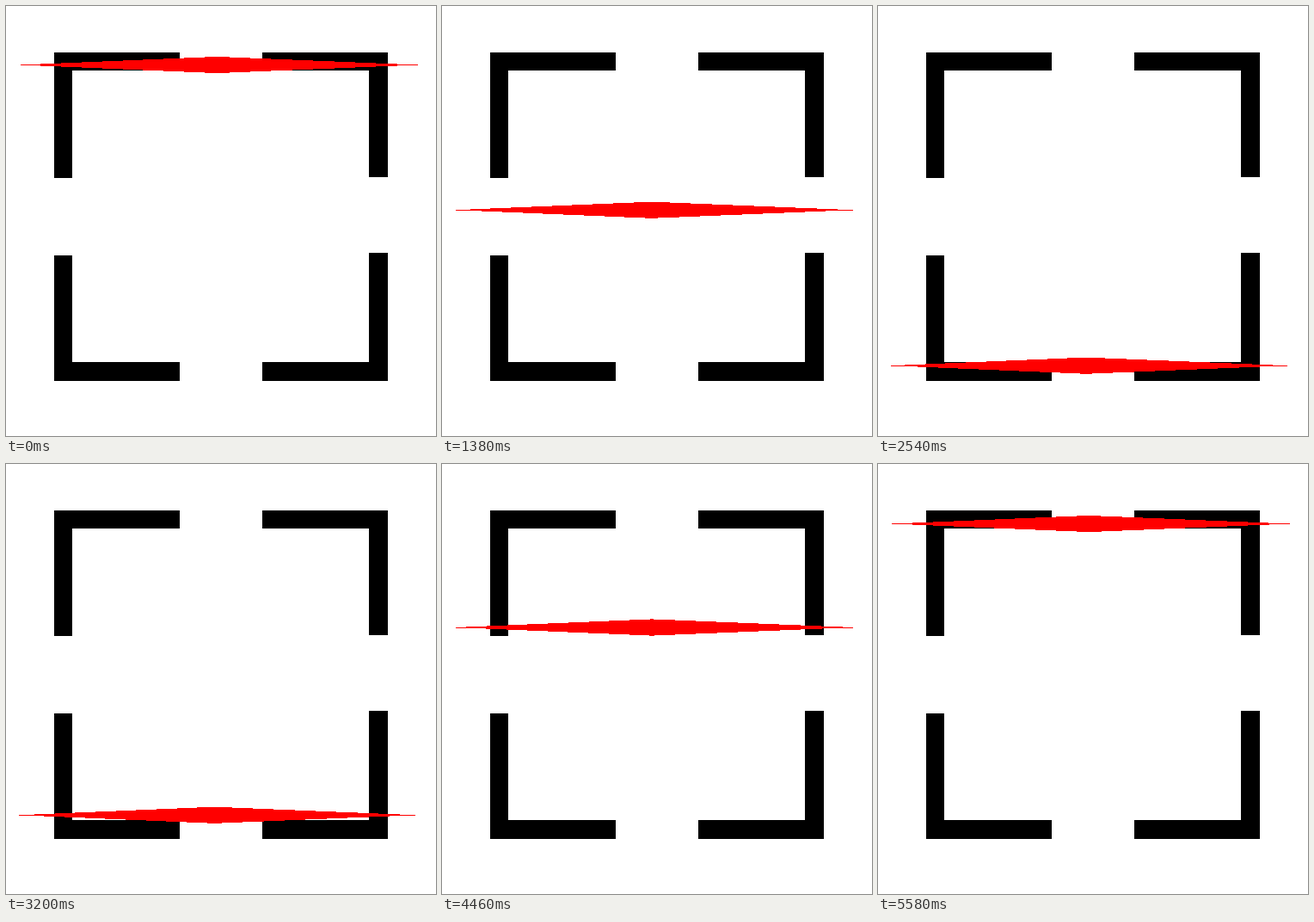
Write an HTML page with a canvas that moves like this. It is 500x500 px and loops after 5680 ms.

```html
<!DOCTYPE html>
<html>
<head>
<meta charset="utf-8">
<style>
html, body { margin: 0; width: 100%; height: 100%; overflow: hidden; background: #fff; }
canvas { display: block; width: 500px; height: 500px; }
</style>
</head>
<body>
<canvas id="stage" width="500" height="500"></canvas>
<script>
const ctx = document.getElementById('stage').getContext('2d');
const LOOP = 5680, LAST = 119, HALF = 59.6;
const TOP = 68.5, END = 69.5, BOTTOM = 422.3, THICK = 9.6;

// corner brackets: x, y, w, h
const bars = [
  [56, 54, 146, 21], [56, 54, 21, 146],
  [298, 54, 146, 21], [422, 54, 22, 145],
  [56, 414, 146, 22], [56, 290, 21, 146],
  [298, 414, 146, 22], [422, 287, 22, 149]
];

// cubic-bezier(.42, 0, .58, 1)
function ease(x) {
  let lo = 0, hi = 1;
  for (let i = 0; i < 24; i++) {
    const t = (lo + hi) / 2, u = 1 - t;
    if (3 * u * u * t * 0.42 + 3 * u * t * t * 0.58 + t * t * t < x) lo = t;
    else hi = t;
  }
  return lo * lo * (3 - 2 * lo);
}

// uneven cadence: three steps every 140 ms, held 20, 100 and 20 ms
function stepAt(ms) {
  const r = ms % 140;
  return Math.min(LAST, 3 * Math.floor(ms / 140) + (r < 20 ? 0 : r < 120 ? 1 : 2));
}

function drawBeam(y, p) {
  const left = 16.5 - 1.5 * p, apex = 245 - 3 * p, right = 479 - 3 * p;
  const span = (row, w) => {
    const a = Math.round(apex - (apex - left) * w);
    const b = Math.round(apex + (right - apex) * w);
    ctx.fillRect(a, row, b - a, 1);
  };
  ctx.fillStyle = '#f00';
  for (let row = Math.floor(y - THICK); row <= y + THICK; row++) {
    const w = 1 - Math.abs(row + 0.5 - y) / THICK;
    if (w > 0) span(row, w);
  }
  span(Math.floor(y), 1);
}

function draw(ms) {
  const n = stepAt(ms), down = n < HALF;
  const p = ease(down ? n / HALF : Math.max(0, 2 - n / HALF));
  const start = down ? TOP : END;
  ctx.fillStyle = '#fff';
  ctx.fillRect(0, 0, 500, 500);
  ctx.fillStyle = '#000';
  for (const b of bars) ctx.fillRect(...b);
  drawBeam(start + (BOTTOM - start) * p, p);
}

const t0 = performance.now();
function tick() {
  draw((performance.now() - t0) % LOOP);
  requestAnimationFrame(tick);
}
tick();
</script>
</body>
</html>
```
